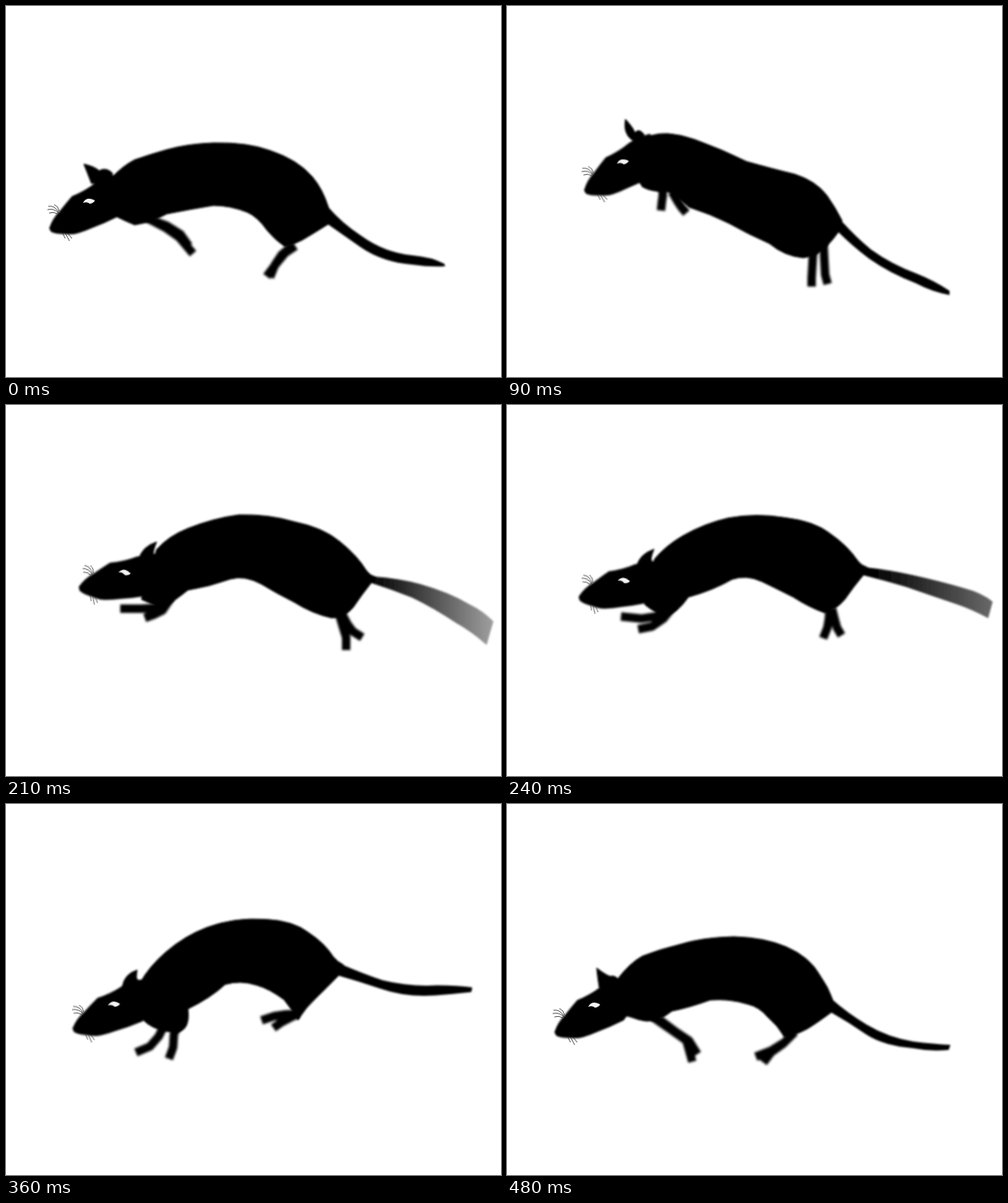
An HTML page without scripts for the animation above (510 ms loop, 585x439 px).

```html
<!DOCTYPE html>
<html lang="en">
<head>
<meta charset="utf-8">
<title>Running rat</title>
<style>
html, body { margin: 0; width: 100%; height: 100%; overflow: hidden; background: #fff; }
svg { display: block; width: 585px; height: 439px; }

.body, .tail, .legs, .head, .fade { animation: 510ms infinite; }
.body { animation-name: body; stroke: #000; stroke-linejoin: round; }
.tail { animation-name: tail; fill: url(#tailInk); }
.legs { animation-name: legs; fill: none; stroke: #000; stroke-width: 10; stroke-linejoin: round; }
.head { animation-name: head; }
.fade { animation-name: fade; }
.whiskers { fill: none; stroke: #333; stroke-width: .8; }

/* Every pose is held for 30 ms; steps() fills in the poses between the key ones. */
/* Ear, then torso clockwise from the neck. */
@keyframes body {
  0%, 100% { animation-timing-function: steps(3); d: path("M101,210Q96,197 92,187Q105,190 110,195Q118,190 126,198L122,208ZM124,204Q138,189 152,182Q172,175 190,170Q215,163 245,162Q285,161 312,171Q345,182 362,202Q374,216 381,238L381,258Q362,270 350,277Q338,283 330,285Q318,277 309,266Q297,249 285,244Q265,236 245,236Q215,241 190,246Q172,256 152,259Q140,254 128,248Z"); }
  17.647% { animation-timing-function: steps(2); d: path("M147,158Q137,150 140,134Q150,145 151,150Q156,144 162,152L158,164ZM155,160Q172,150 190,151Q205,152 222,158Q255,170 283,184Q315,193 340,199Q365,207 378,224Q388,238 396,254L392,267Q385,277 378,284Q368,296 350,298Q328,296 310,281Q285,270 262,257Q240,246 215,238Q200,225 190,220Q170,220 160,214Q156,208 152,200Z"); }
  29.412% { animation-timing-function: steps(2); d: path("M156,166Q155,150 167,140Q168,150 169,155Q176,154 178,164L172,172ZM177,168Q190,152 212,147Q240,146 268,149Q300,152 335,170Q365,180 385,198Q403,215 413,237Q418,243 424,249L416,260Q405,269 395,278Q385,286 370,286Q347,284 330,260Q310,245 292,233Q275,222 262,219Q232,220 206,212Q190,208 180,210Q173,205 168,200Z"); }
  41.176% { animation-timing-function: steps(3); d: path("M157,183Q160,168 178,162Q174,172 174,176Q178,176 170,184L164,188ZM178,171Q192,155 215,146Q245,134 275,130Q310,129 340,138Q375,145 395,162Q415,178 426,196Q430,202 438,204L432,210Q420,225 410,240Q400,252 385,252Q362,247 340,233Q318,222 302,212Q282,201 265,206Q240,215 215,219Q195,235 185,240Q172,236 160,230Z"); }
  58.824% { animation-timing-function: steps(4); d: path("M146,208Q148,194 165,188Q161,198 163,200Q168,206 168,209L158,214ZM167,205Q178,190 192,173Q210,152 235,141Q265,125 305,124Q340,122 358,134Q378,144 391,160Q396,166 404,170L400,183Q385,200 378,210Q368,222 357,234Q350,226 335,216Q312,204 300,203Q285,199 268,207Q250,228 213,244Q214,270 190,268Q176,264 168,248Z"); }
  82.353% { animation-timing-function: steps(2); d: path("M129,224Q132,208 145,205Q146,212 146,214Q152,214 151,220L145,232ZM150,218Q160,195 185,178Q212,160 240,151Q275,143 308,149Q340,154 358,171Q375,185 383,202Q388,208 394,211L386,223Q370,238 358,246Q340,260 333,277Q327,262 322,247Q310,233 293,226Q270,217 250,220Q235,230 217,241Q224,282 190,270Q168,268 155,262Z"); }
  94.118% { animation-timing-function: steps(1); d: path("M109,217Q107,205 106,194Q116,202 122,204Q129,202 133,210L126,218ZM130,208Q145,188 160,180Q180,172 205,166Q230,158 268,157Q305,158 330,169Q358,181 370,203Q380,217 385,232L384,246Q365,260 355,266Q340,274 328,276Q320,262 308,252Q298,240 285,237Q262,230 240,232Q215,241 195,245Q175,262 155,255Q143,250 133,250Z"); }
}

@keyframes tail {
  0%, 100% { animation-timing-function: steps(3); d: path("M380,237Q397,257 420,272Q448,292 480,295Q503,297 518,305L519,308Q500,309 480,306Q445,303 420,286Q400,272 380,258Z"); }
  17.647% { animation-timing-function: steps(2); d: path("M394,253Q412,273 430,288Q455,306 485,317Q505,325 523,337L523,342Q502,338 483,328Q452,316 428,299Q408,284 390,266Z"); }
  29.412% { animation-timing-function: steps(2); d: path("M422,248Q446,261 465,270Q495,284 520,304Q537,317 548,331L547,337Q530,325 515,312Q490,293 462,280Q440,268 414,259Z"); }
  41.176% { animation-timing-function: steps(3); d: path("M434,203Q465,205 490,212Q525,222 548,236Q563,243 576,256L568,284Q550,268 532,258Q505,240 480,228Q455,218 430,210Z"); }
  58.824% { animation-timing-function: steps(4); d: path("M402,170Q430,176 455,179Q495,183 530,180Q555,180 570,186L570,189Q550,190 530,191Q490,196 455,190Q430,187 398,183Z"); }
  82.353% { animation-timing-function: steps(2); d: path("M392,210Q415,226 435,238Q460,250 490,249Q515,249 532,248L530,256Q505,260 485,262Q455,262 430,247Q405,233 384,222Z"); }
  94.118% { animation-timing-function: steps(1); d: path("M384,231Q402,247 425,261Q450,276 480,281Q505,284 524,285L522,291Q500,293 480,289Q445,286 425,273Q405,259 382,246Z"); }
}

/* Two front legs, then two hind legs. */
@keyframes legs {
  0%, 100% { animation-timing-function: steps(3); d: path("M165,250L188,262L205,274L221,293M168,252L190,260L206,270L216,284M338,284L326,294L318,306L312,321M342,284L330,292L320,304L308,320"); }
  17.647% { animation-timing-function: steps(2); d: path("M184,215L184,225L183,232L182,242M195,220L202,232L206,238L212,245M362,285L361,305L360,322L360,332M374,280L375,300L376,318L379,329"); }
  29.412% { animation-timing-function: steps(2); d: path("M182,208L174,222L165,230L152,237M196,208L196,222L196,230L196,240M384,282L388,295L389,302L387,308M388,282L395,295L400,305L408,312"); }
  41.176% { animation-timing-function: steps(3); d: path("M190,228L178,240L160,241L135,241M195,228L185,243L175,248L164,252M393,245L398,262L402,275L402,290M396,245L404,260L410,268L421,275"); }
  58.824% { animation-timing-function: steps(4); d: path("M195,250L175,270L158,276L134,269M205,252L185,272L165,290L137,292M358,232L345,236L332,240L317,248M360,232L355,245L350,255L344,268"); }
  82.353% { animation-timing-function: steps(2); d: path("M188,255L186,280L182,298L173,319M208,258L212,272L230,286L248,311M330,265L316,262L302,262L287,264M330,265L316,261L302,261L288,262"); }
  94.118% { animation-timing-function: steps(1); d: path("M172,252L195,268L212,280L219,305M180,255L200,270L215,280L225,296M340,270L328,282L312,292L294,299M338,272L326,284L312,294L303,306"); }
}

/* The head is rigid and turns about the nose. */
@keyframes head {
  0%, 100% { animation-timing-function: steps(3); transform: translate(51px, 263px) rotate(0deg); }
  17.647% { animation-timing-function: steps(2); transform: translate(91px, 218px) rotate(-2deg); }
  29.412% { animation-timing-function: steps(2); transform: translate(95px, 211px) rotate(8deg); }
  41.176% { animation-timing-function: steps(3); transform: translate(86px, 215px) rotate(17deg); }
  58.824% { animation-timing-function: steps(4); transform: translate(82px, 250px) rotate(10deg); }
  82.353% { animation-timing-function: steps(2); transform: translate(75px, 281px) rotate(-2deg); }
  94.118% { animation-timing-function: steps(1); transform: translate(56px, 270px) rotate(0deg); }
}

/* The tail smears to grey while it whips upward. */
@keyframes fade {
  0%, 29.412% { animation-timing-function: steps(2); stop-color: #000; }
  41.176% { animation-timing-function: steps(3); stop-color: #999; }
  58.824%, 100% { stop-color: #000; }
}
</style>
</head>
<body>
<svg viewBox="0 0 585 439" role="img" aria-label="Silhouette of a running rat">
  <defs>
    <filter id="soft" filterUnits="userSpaceOnUse" x="0" y="0" width="585" height="439"><feGaussianBlur stdDeviation="1.2"/></filter>
    <filter id="smear" filterUnits="userSpaceOnUse" x="0" y="0" width="585" height="439"><feGaussianBlur stdDeviation="1.7"/></filter>
    <linearGradient id="tailInk" gradientUnits="userSpaceOnUse" x1="430" y1="0" x2="570" y2="0">
      <stop offset="0"/>
      <stop class="fade" offset="1"/>
    </linearGradient>
  </defs>

  <g filter="url(#smear)"><path class="legs"/></g>
  <g filter="url(#soft)">
    <path class="tail"/>
    <path class="body"/>
    <path class="head" d="M0,0Q4,-12 13,-21Q20,-30 27,-38Q42,-44 55,-54Q68,-62 80,-64L100,-40L82,-14Q66,-6 50,0Q30,9 20,7Q6,7 2,4Z"/>
  </g>
  <g class="head">
    <path fill="#f4f4f4" d="M40,-30Q44,-38 54,-33Q53,-30 48,-29Q45,-32 40,-30Z"/>
    <path class="whiskers" d="M11,-18Q6,-24 -2,-22M11,-19Q7,-27 -1,-26M12,-20Q11,-26 6,-28M10,-17Q5,-20 0,-18M16,6L19,12M19,6L24,15M22,6L27,12"/>
  </g>
</svg>
</body>
</html>
```
